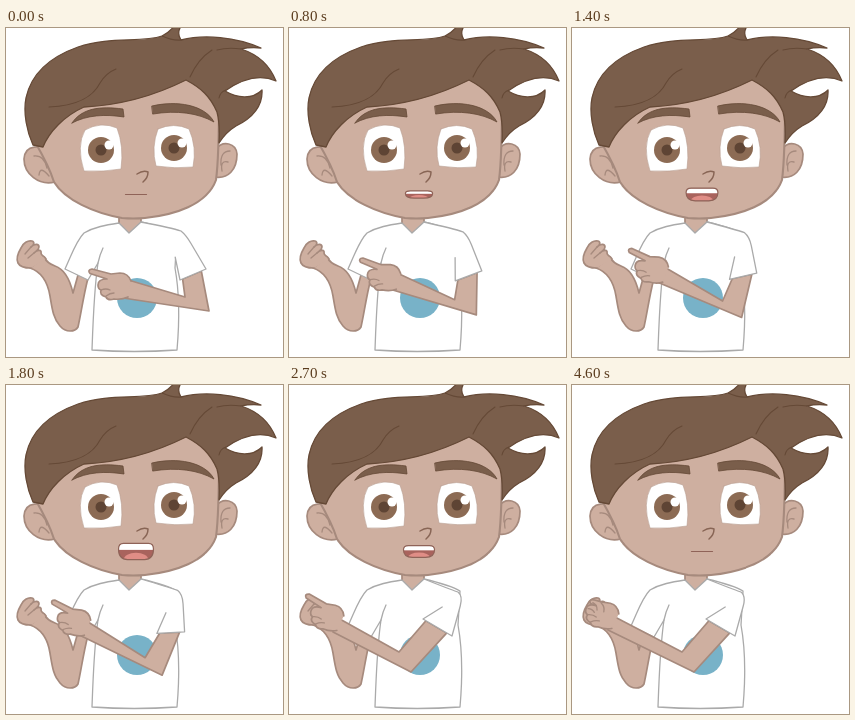
Recreate the animation shown at these times as an HTML page. Size 277 by 329 pixels, loop 5 s.

```html
<!DOCTYPE html>
<html lang="en">
<head>
<meta charset="utf-8">
<title>Boy holding his wrist</title>
<style>
html, body { margin: 0; width: 100%; height: 100%; overflow: hidden; background: #fff; }
svg { display: block; width: 277px; height: 329px; }
path { stroke-linejoin: round; stroke-linecap: round; }
.skin { fill: #ceafa0; stroke: #a68a7d; stroke-width: 1.7; }
.line { fill: none; stroke: #a68a7d; stroke-width: 1.3; }
.hair { fill: #7a5e4b; stroke: #654936; stroke-width: 1.3; }
.strand { fill: none; stroke: #654936; stroke-width: 1.1; }
.cloth { fill: #fff; stroke: #aaa; stroke-width: 1.3; }
.brow { fill: #7a5e4b; stroke: #654936; stroke-width: .8; }
.white { fill: #fff; stroke: #b79c8f; stroke-width: .6; }
</style>
</head>
<body>
<svg viewBox="0 0 277 329">
  <!-- neck, left arm and shirt -->
  <path class="skin" d="M113 184V197L123 206L135 195V184Z"/>
  <path class="skin" d="M72 247L67 265C64 252 58 241 49 238C43 236 40 233 38 229L24 240C36 244 42 256 44 268C46 280 47 290 54 298C60 305 69 304 72 299C75 286 77 270 82 250"/>
  <path class="cloth" d="M113 195L123 205L135 194C152 198 163 201 171 206L169 240C173 262 174 288 171 322Q128 325 86 322C87 294 88 262 92 235L82 252L59 241C66 226 70 213 78 205C88 199 100 197 113 195Z"/>
  <path class="line" style="stroke:#aaa" d="M92 235Q94 226 97 220"/>
  <circle cx="131" cy="270" r="20" fill="#78b2c8"/>

  <!-- open hand -->
  <path class="skin" d="M25 240C20 240 14 239 12 235C10 231 12 225 15 220C17 215 22 212 26 213C29 214 28 217 25 219C29 215 33 216 33 219C33 222 30 223 28 225C32 221 36 222 35 225C35 228 38 227 40 231"/>
  <path class="line" d="M25 219L19 226M28 225L22 230"/>

  <path id="arm" class="skin"/>
  <path id="sleeve" class="cloth"/>
  <g id="hand">
    <path id="palm" class="skin"/>
    <path class="line" d="M-16 4Q-11 2 -7 4M-11 10Q-7 7 -3 7"/>
    <path id="grip" class="line" d="M-14 -9Q-9 -8 -8 -3M-6 -11Q-1 -8 -1 -3M-17 -2Q-13 -3 -10 0"/>
  </g>

  <!-- head -->
  <path class="skin" d="M44 126C36 116 19 116 18 131C18 146 33 158 49 154"/>
  <path class="line" d="M28 128Q38 127 41 140M33 147Q34 137 43 148"/>
  <path class="skin" d="M210 121C217 112 230 115 231 126C231 142 222 151 209 149"/>
  <path class="line" d="M224 123Q214 123 215 137M222 134Q214 132 216 143"/>
  <path class="skin" style="stroke-width:2.1" d="M29 114C36 126 43 138 48 154C59 172 88 185 116 190Q127 191 139 190C168 187 201 177 210 152C213 130 213 100 213 68L165 42L70 70Z"/>
  <path class="hair" d="M27 117C21 104 17 85 20 70C25 46 44 29 72 19C104 8 135 15 156 8Q164 4 169 -3L174 0Q171 6 175 12C198 6 230 9 255 20Q244 19 235 21C254 27 264 38 270 53C254 46 236 51 219 63C231 70 246 72 256 62C257 80 244 91 230 98Q220 104 213 115Q214 95 211 84C204 68 195 60 180 52C154 65 120 77 78 79C58 88 43 104 37 119Z"/>
  <path class="strand" d="M43 79C73 78 88 67 94 55Q100 45 110 41M184 49Q192 31 206 22M213 70Q214 64 220 62M156 8Q167 13 175 12M235 21Q222 19 211 22"/>

  <!-- face -->
  <path class="brow" d="M66 95C76 80 94 78 117 81L118 89C99 86 81 87 66 95Z"/>
  <path class="brow" d="M146 78C171 72 199 77 208 94C192 85 171 82 147 86Z"/>
  <path class="white" d="M79 102Q95 93 111 100Q118 118 115 141Q98 144 78 143Q70 118 79 102Z"/>
  <path class="white" d="M152 101Q168 94 183 101Q191 119 187 139Q169 141 150 138Q145 119 152 101Z"/>
  <g id="eye">
    <circle cx="95" cy="122" r="13" fill="#8c6b54"/>
    <circle cx="95" cy="122" r="5.5" fill="#5e4434"/>
    <circle cx="103" cy="117" r="4.5" fill="#fff"/>
  </g>
  <use href="#eye" x="73" y="-2"/>
  <path d="M131 146Q137 142 142 144Q142 150 137 154" fill="none" stroke="#886555" stroke-width="1.5"/>
  <clipPath id="lips"><path id="lipClip"/></clipPath>
  <g clip-path="url(#lips)">
    <rect x="105" y="150" width="50" height="35" fill="#a9635d"/>
    <ellipse id="tongue" cx="130" fill="#e08d86"/>
    <rect id="teeth" x="105" width="50" fill="#fff"/>
  </g>
  <path id="mouth" fill="none" stroke="#8f6358" stroke-width="1.2"/>
</svg>
<script>
const LOOP = 5000, STEP = 100;
const REACH = 2700, GRIP = 3500, SHOUT = 2000;

const $ = id => document.getElementById(id);
const clamp = v => Math.min(1, Math.max(0, v));
const mix = (a, b, k) => a + (b - a) * k;
const between = (p, q, k) => p.map((v, i) => mix(v, q[i], k));
const add = (p, q) => p.map((v, i) => v + q[i]);

// Straight travel from p to q that sags downwards on the way.
const swing = (p, q, k, sag) => add(between(p, q, k), [0, sag * 4 * k * (1 - k)]);

function drawArm(reach, grip) {
  const hand = add(swing([111, 258], [40, 232], reach, -6), [-8 * grip, -2 * grip]);
  const elbow = swing([203, 283], [122, 287], reach, 5);
  const inner = add(elbow, between([-24, -14], [-12, -20], reach));
  const top = add(hand, between([8, -7], [9, 1], reach));
  const low = add(hand, between([6, 12], [4, 15], reach));
  const shoulder = between([180, 207], [174, 211], reach);
  const cuff = between([200, 241], [163, 251], reach);
  const cuffIn = swing([174, 252], [134, 234], reach, 7);
  const seam = between(cuffIn, [166, 214], .6);

  $('arm').setAttribute('d', 'M' + [top, inner, between(cuffIn, cuff, .1),
    between(cuffIn, cuff, .82), elbow, low].join('L'));
  $('sleeve').setAttribute('d',
    `M135 194Q${add(shoulder, [-14, -7])} ${add(shoulder, [-5, -4])}` +
    `Q${shoulder} ${between(shoulder, cuff, .25)}L${[cuff, cuffIn, seam].join('L')}`);
  const turn = 15 * (1 - (1 - reach) ** 2);
  $('hand').setAttribute('transform', `translate(${hand}) rotate(${turn})`);
}

function drawHand(grip) {
  const tip = between([-27, -14], [-16, -9], grip);
  $('palm').setAttribute('d',
    `M14 -5Q11 -13 3 -13L-6 -12L${add(tip, [2, -3])}Q${add(tip, [-3, -2])} ${add(tip, [0, 1.5])}L-10 -7` +
    'Q-19 -7 -19 -1Q-19 3 -16 4Q-18 9 -11 11Q-9 15 -3 13Q5 14 11 11');
  $('grip').setAttribute('opacity', grip);
}

function drawMouth(open) {
  const h = 18 * open, w = 10.5 + h * .43;
  const top = 166.5 - h / 2, low = top + h, side = top + h * .35;
  const l = 130 - w, r = 130 + w;
  const d = h < .5 ? `M${l} 166.5H${r}` :
    `M${l} ${side}Q${l} ${top} ${l + 5} ${top}H${r - 5}Q${r} ${top} ${r} ${side}` +
    `Q${r} ${low} ${r - 9} ${low}H${l + 9}Q${l} ${low} ${l} ${side}Z`;
  $('mouth').setAttribute('d', d);
  $('lipClip').setAttribute('d', d);
  $('teeth').setAttribute('y', top);
  $('teeth').setAttribute('height', h * .4);
  $('tongue').setAttribute('cy', low);
  $('tongue').setAttribute('rx', w * .7);
  $('tongue').setAttribute('ry', h * .42);
}

const start = performance.now();
function frame() {
  const t = Math.floor((performance.now() - start) % LOOP / STEP) * STEP;
  const reach = clamp(t / REACH) ** 1.35;
  const grip = clamp((t - REACH) / (GRIP - REACH));
  drawArm(reach, grip);
  drawHand(grip);
  drawMouth(clamp(1 - Math.abs(t / SHOUT - 1)));
  requestAnimationFrame(frame);
}
frame();
</script>
</body>
</html>
```
